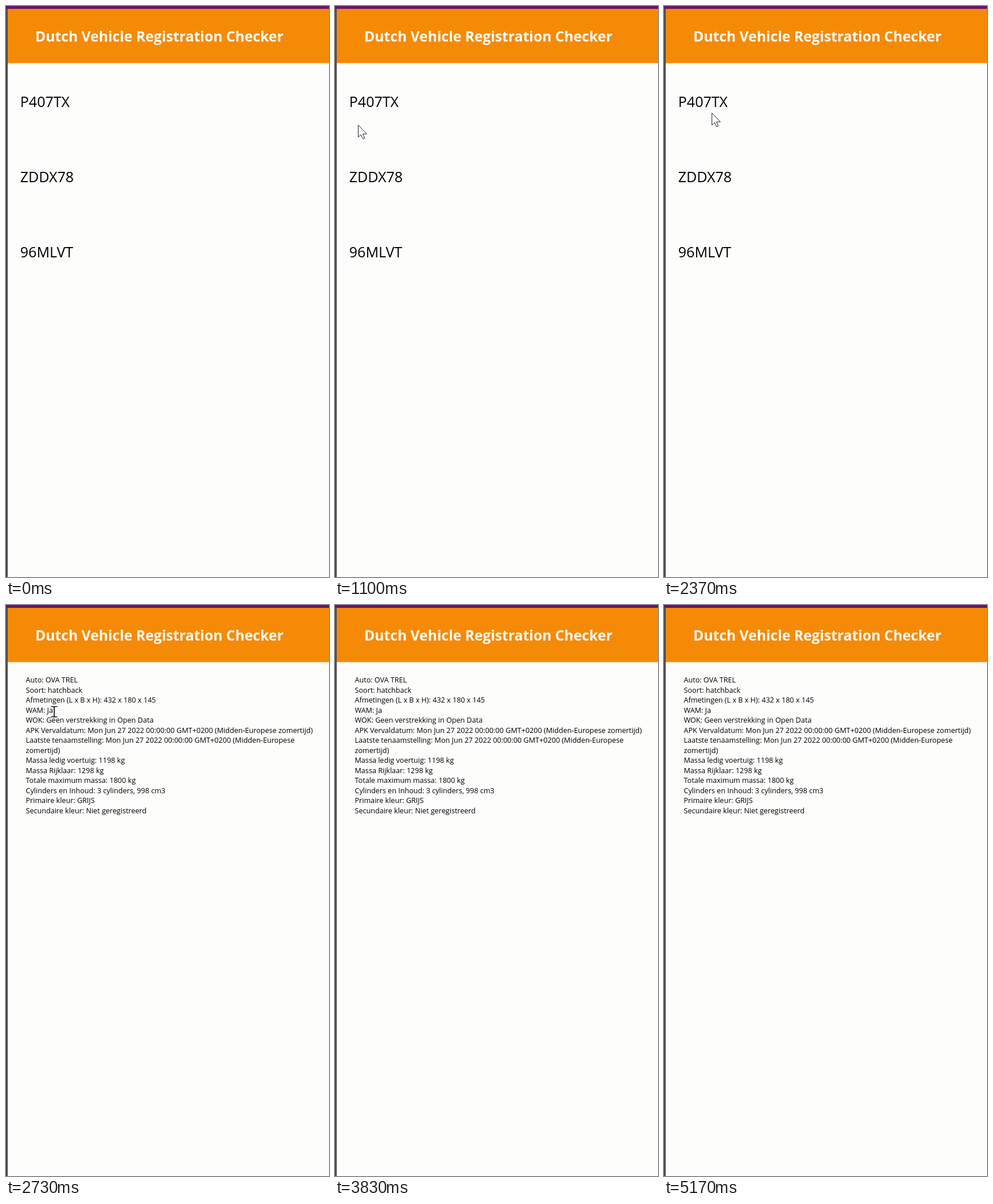
Animation, 563 px wide and 995 px high, one loop 5210 ms. Source, as an HTML page:

```html
<!DOCTYPE html>
<html lang="nl">
<head>
<meta charset="utf-8">
<title>Dutch Vehicle Registration Checker</title>
<style>
  html, body { margin: 0; width: 100%; height: 100%; overflow: hidden; background: #fdfdfc; }
  svg { display: block; width: 563px; height: 995px; }
  text { font-family: "Open Sans", "Noto Sans", sans-serif; white-space: pre; }
  .title { font-size: 24.7px; font-weight: 700; fill: #fff; }
  .plate { font-size: 25px; fill: #000; }
  .detail { font-size: 12.6px; fill: #000; }
</style>
</head>
<body>
<svg viewBox="0 0 563 995">
  <rect width="563" height="995" fill="#fdfdfc"/>
  <rect width="3" height="995" fill="#4f4b4f"/>
  <rect x="3" y="5" width="560" height="94.5" fill="#f58a07"/>
  <rect width="563" height="5" fill="#6c1468"/>
  <text class="title" x="51" y="62">Dutch Vehicle Registration Checker</text>
  <g id="list"></g>
  <g id="info"></g>
  <path id="arrow" d="M.5 .5V21.5L5.2 17.2L8.6 24.5L11.6 23.2L8.4 16H15.3Z"
        fill="#fff" stroke="#222" stroke-width="1"/>
  <path id="beam" d="M-5.5 -9H-2Q0 -9 0 -7.5Q0 -9 2 -9H5.5M0 -8V8M-5.5 9H-2Q0 9 0 7.5Q0 9 2 9H5.5"
        fill="none" stroke="#111" stroke-width="1.7"/>
</svg>
<script>
const LOOP = 5210, OPEN_AT = 2500;
const $ = id => document.getElementById(id);

const plates = ["P407TX", "ZDDX78", "96MLVT"];
const details = [
  "Auto: OVA TREL",
  "Soort: hatchback",
  "Afmetingen (L x B x H): 432 x 180 x 145",
  "WAM: Ja",
  "WOK: Geen verstrekking in Open Data",
  "APK Vervaldatum: Mon Jun 27 2022 00:00:00 GMT+0200 (Midden-Europese zomertijd)",
  "Laatste tenaamstelling: Mon Jun 27 2022 00:00:00 GMT+0200 (Midden-Europese",
  "zomertijd)",
  "Massa ledig voertuig: 1198 kg",
  "Massa Rijklaar: 1298 kg",
  "Totale maximum massa: 1800 kg",
  "Cylinders en Inhoud: 3 cylinders, 998 cm3",
  "Primaire kleur: GRIJS",
  "Secundaire kleur: Niet geregistreerd"
];

function addLines(group, lines, cls, x, y, step) {
  lines.forEach((line, i) => {
    const el = document.createElementNS("http://www.w3.org/2000/svg", "text");
    el.setAttribute("class", cls);
    el.setAttribute("x", x);
    el.setAttribute("y", Math.round(y + i * step));
    el.textContent = line;
    group.append(el);
  });
}
addLines($("list"), plates, "plate", 24.8, 176, 130.8);
addLines($("info"), details, "detail", 34.5, 135, 17.54);

// Pointer route: time, x, y
const route = [
  [900, -18, 226], [1300, 98, 188], [1570, 104, 185], [1950, 102, 184],
  [2370, 83, 186], [2720, 83, 186], [3160, 580, 262]
];

function pointerAt(t) {
  const i = route.findIndex(p => p[0] > t);
  if (i < 1) return null;
  const [t0, x0, y0] = route[i - 1], [t1, x1, y1] = route[i];
  const u = (t - t0) / (t1 - t0), k = u * u * (3 - 2 * u);
  return [x0 + (x1 - x0) * k, y0 + (y1 - y0) * k];
}

function overText(x, y, open) {
  return open ? x > 35 && x < 536 && y > 121 && y < 367
              : x > 25 && x < 110 && y > 149 && y < 185.5;
}

function place(el, pos) {
  el.style.display = pos ? "" : "none";
  if (pos) el.setAttribute("transform", `translate(${pos.map(Math.round)})`);
}

function draw(now) {
  const t = now % LOOP, open = t >= OPEN_AT;
  $("list").style.display = open ? "none" : "";
  $("info").style.display = open ? "" : "none";
  const pos = pointerAt(t);
  const beam = pos && overText(...pos, open);
  place($("beam"), beam ? pos : null);
  place($("arrow"), beam ? null : pos);
}

const start = performance.now();
function tick() {
  draw(performance.now() - start);
  requestAnimationFrame(tick);
}
tick();
</script>
</body>
</html>
```
